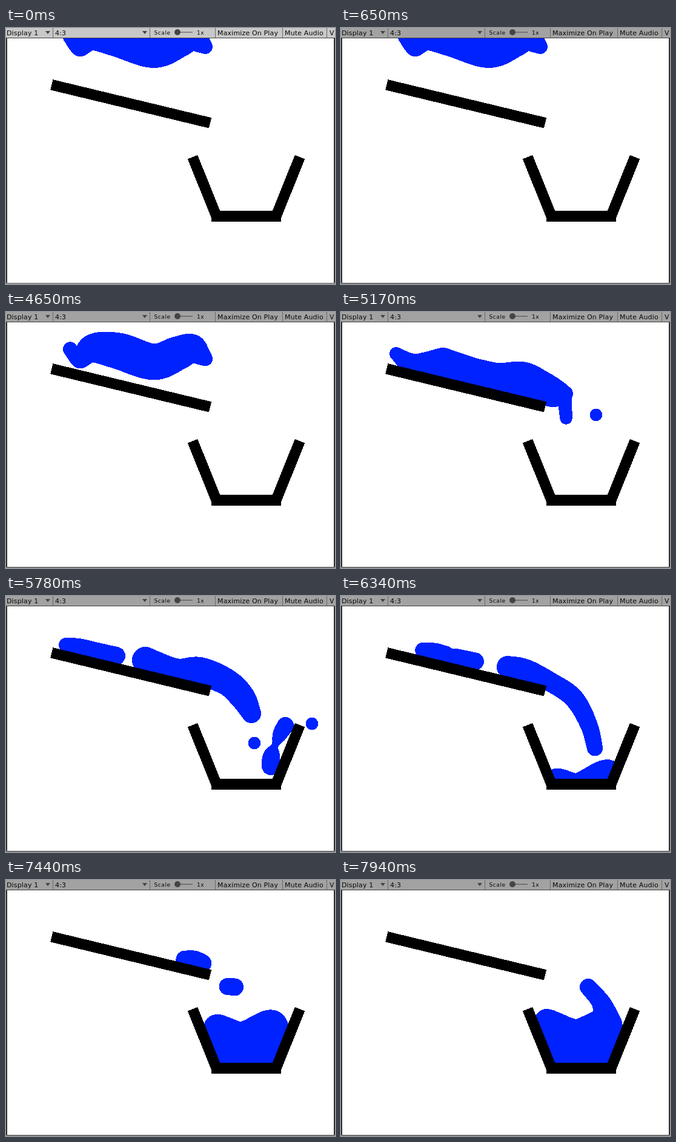
Recreate the animation shown at these times as an HTML page. Size 543 by 423 pixels, loop 8000 ms.

```html
<!DOCTYPE html>
<html lang="en">
<head>
<meta charset="utf-8">
<title>Fluid ramp</title>
<style>
html, body { margin: 0; width: 100%; height: 100%; overflow: hidden; background: #fff; }
svg { display: block; width: 543px; height: 423px; }
text { font: 11px "DejaVu Sans", sans-serif; letter-spacing: .15px; fill: #080808; }
.small { font-size: 9px; letter-spacing: .6px; }
</style>
</head>
<body>
<svg viewBox="0 0 543 423">
  <clipPath id="open"><path d="M0 0H543V311H495L485 213 447 311H346L308 213 300 147 76 94H0z"/></clipPath>
  <g shape-rendering="crispEdges">
    <path id="fluid" fill="#0022ff" clip-path="url(#open)"/>
    <path stroke="#000" stroke-width="17.7" d="M75.300 93.800L337 156.900M308 213.200L347.400 311M485 213.200L445.700 311M339 311H454"/>
    <path fill="#303030" d="M0 17H2V423H0zM541 17H543V423H541z"/>
    <path id="foot" d="M0 421H543V423H0z"/>
    <path id="bar" d="M0 0H543V16H0z"/>
    <path fill="#404040" d="M0 16H543V17H0z"/>
    <path stroke="#6a6a6a" d="M77.500 0v16M237.500 0v16M345.500 0v16M456.500 0v16M529.500 0v16"/>
  </g>
  <path fill="#444" d="M65 5h8l-4 5zM225 5h8l-4 5zM286 6.500h22v1h-22z"/>
  <circle cx="283" cy="7" r="5" fill="#444"/>
  <text x="1" y="12">Display 1</text>
  <text x="81" y="12">4:3</text>
  <text class="small" x="244.500" y="11">Scale</text>
  <text class="small" x="315" y="11">1x</text>
  <text x="349" y="12">Maximize On Play</text>
  <text x="460" y="12">Mute Audio</text>
  <text x="534" y="12">V</text>
</svg>
<script>
const $ = id => document.getElementById(id);
const LOOP = 8000;

// [time, number of equal steps until the next time]
const beats = [[0, 1], [3790, 1], [4260, 1], [4440, 9], [5170, 1], [5260, 7], [5780, 3],
  [6020, 1], [6100, 9], [6860, 1], [6930, 9], [7660, 1], [7750, 2], [7940, 1], [LOOP, 1]];

// Every body of fluid is a brush stroke: a smooth spine of [x, y, radius]
const mix = (a, b, s) => a.map((v, i) => v + (b[i] - v) * s);
const move = (spine, dx, dy) => spine.map(([x, y, r]) => [x + dx, y + dy, r]);
const line = (n, a, b) => Array.from({ length: n }, (_, i) => mix(a, b, i / (n - 1)));
const drop = (...keys) => keys.map(([t, x, y]) => [t, [[x, y, 10.3]]]);

const hanging = [[106, 15, 12], [121, 36, 11], [142, 14, 23], [185, 18, 30], [243, 36, 30],
  [283, 22, 28], [306, 13, 23], [318, 22, 18], [329, 31, 12]];
const landed = [[91, 69, 11], [122, 88, 19], [168, 86, 27], [215, 101, 26], [258, 113, 29],
  [298, 111, 29], [325, 121, 27], [350, 133, 24], [370, 135, 13]];
const pouring = [[230, 106, 22], [280, 126, 23], [320, 125, 24], [364, 142, 22], [390, 167, 21], [405, 194, 16]];
const stream = [[278, 118, 18], [305, 124, 20], [345, 142, 16], [385, 170, 16], [410, 215, 14], [420, 255, 13]];
const blob = line(6, [398, 177, 12.5], [408, 194, 13]);
const rear = [[214, 109, 15], [229, 111, 17], [243, 115, 15]];
const second = [[294, 127, 14], [306, 128, 14.5]];
const wave = [[408, 177, 14], [430, 204, 16], [440, 238, 24]];
const tail = line(5, [369, 140, 12], [371.5, 175.5, 10.3]);
const splash = [[461, 214, 14], [452, 229, 12], [444, 247, 6], [438, 265, 14], [437, 281, 15]];

// The pool runs round the bucket, so that its strokes leave no hole
const left = [362, 288, 24], right = [430, 288, 24];
const pool = (...top) => [left, ...top, right, left];
const filled = pool([355, 253, 22], [392, 268, 30], [441, 241, 25]);
const full = pool([337, 231, 17], [388, 258, 28], [437, 240, 26]);

// Keys are [time, spine, easing power towards the next key]
const tracks = [
  [[0, hanging], [4120, hanging, 2], [4700, move(hanging, 0, 67)], [5170, landed]],
  [[5170, landed.slice(0, 3)], [5780, [[99, 81, 12], [120, 84, 14], [140, 90, 15.5]], 1.35],
    [6930, rear], [7660, move(rear, 122, 34)], [7940, wave], [LOOP, wave]],
  [[5170, landed.slice(2, 4)], [5780, [[140, 90, 15.5], [182, 99, 15]], 1.35],
    [6930, second], [7250, move(second, 45, 11)], [7720, move(second, 120, 118)]],
  [[5170, landed.slice(3)], [5780, pouring], [6300, stream], [6930, blob], [7200, move(blob, 24, 70)]],
  [[4900, move(tail, -25, -50)], [5170, tail], [5780, splash], [6350, move(splash, -12, 85)]],
  [[5780, move(filled, 0, 95)], [6930, filled], [7940, full], [LOOP, full]],
  drop([4750, 318, 100], [5170, 421, 170], [5620, 483, 200], [5780, 505, 211], [6180, 558, 268]),
  drop([5170, 368, 148], [5780, 410, 243], [6100, 432, 325]),
  drop([6500, 320, 132], [6930, 364, 149], [7400, 420, 252]),
];

function pose(keys, t) {
  const i = keys.findIndex(k => k[0] > t);
  if (i < 1) return [];
  const [t0, a, power = 1] = keys[i - 1], [t1, b] = keys[i];
  const s = ((t - t0) / (t1 - t0)) ** power;
  return a.map((p, j) => mix(p, b[j], s));
}

const disc = ([x, y, r]) => `M${x - r},${y}a${r},${r} 0 1 1 ${2 * r},0a${r},${r} 0 1 1 ${-2 * r},0z`;

// Discs along a Catmull-Rom spine
function brush(spine) {
  const n = spine.length, at = i => spine[Math.max(0, Math.min(n - 1, i))];
  let d = spine.slice(-1).map(disc).join("");
  for (let i = 0; i < n - 1; i++) {
    const [a, b, c, e] = [at(i - 1), at(i), at(i + 1), at(i + 2)];
    for (let s = 0; s < 1; s += 1 / 16) {
      d += disc(b.map((v, k) => v + s / 2 * (c[k] - a[k] +
        s * (2 * a[k] - 5 * v + 4 * c[k] - e[k] + s * (3 * (v - c[k]) + e[k] - a[k])))));
    }
  }
  return d;
}

function snap(t) {
  const i = beats.findIndex(b => b[0] > t) - 1;
  const [start, n] = beats[i], step = (beats[i + 1][0] - start) / n;
  return start + Math.floor((t - start) / step + 1e-6) * step;
}

function draw(now) {
  const time = now % LOOP, t = snap(time), dim = time >= 650;
  $("bar").setAttribute("fill", dim ? "#a2a2a2" : "#c8c8c8");
  $("foot").setAttribute("fill", dim ? "#707070" : "#8a8a8a");
  $("fluid").setAttribute("d", tracks.map(keys => brush(pose(keys, t))).join(""));
  requestAnimationFrame(draw);
}
requestAnimationFrame(draw);
</script>
</body>
</html>
```
